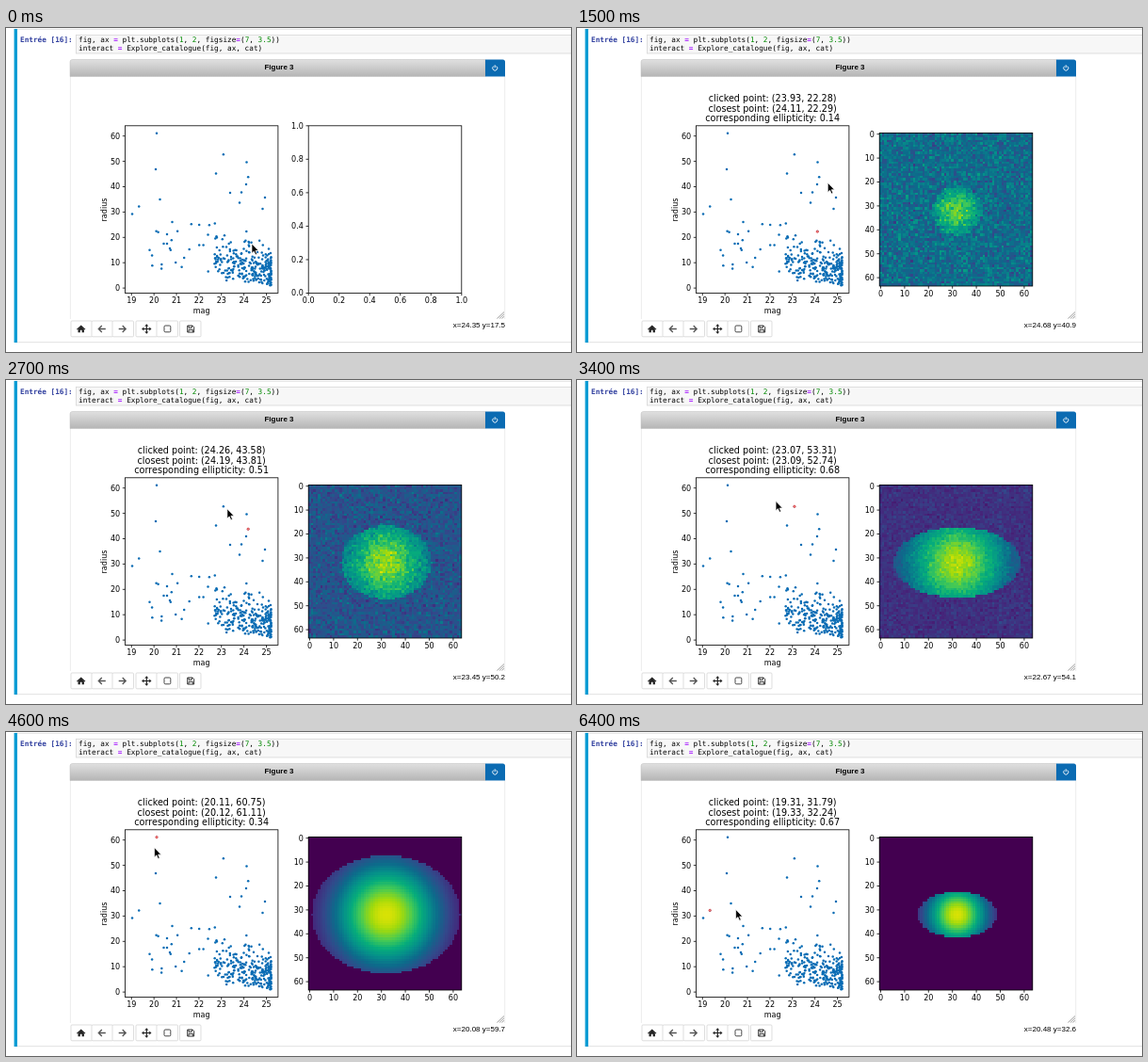
Write an HTML page with a canvas that moves like this. It is 600 by 344 pixels and loops after 7000 ms.

```html
<!DOCTYPE html>
<html lang="fr">
<head>
<meta charset="utf-8">
<style>
html, body { margin: 0; width: 100%; height: 100%; overflow: hidden; background: #fff; }
canvas { position: absolute; left: 321.2px; top: 111.4px; width: 162.6px; height: 162.6px; image-rendering: pixelated; }
svg { position: absolute; left: 0; top: 0; width: 600px; height: 344px; }
.plot { font: 8.05px "DejaVu Sans", sans-serif; }
.title { font-size: 9.65px; text-anchor: middle; }
.axis { fill: none; stroke: #000; stroke-width: .8; }
.code { font: 7.73px "DejaVu Sans Mono", monospace; white-space: pre; }
.op { fill: #a2f; font-weight: bold; }
.num { fill: #080; }
.ui { font: 8px "Liberation Sans", Arial, sans-serif; }
.head { font-weight: bold; text-anchor: middle; }
</style>
</head>
<body>
<canvas id="image" width="64" height="64"></canvas>
<svg viewBox="0 0 600 344">
  <defs>
    <linearGradient id="bar" x2="0" y2="1">
      <stop stop-color="#e0e0e0"/><stop offset="1" stop-color="#b5b5b5"/>
    </linearGradient>
  </defs>
  <path d="M9 1.3H600M9 333.7H600" stroke="#d4d4d4" stroke-width=".7"/>
  <rect x="8.6" y="1" width="3.4" height="333" fill="#089cd4"/>
  <rect x="74.5" y="7.5" width="540" height="19.5" fill="#f7f7f7" stroke="#d2d2d2" stroke-width=".7"/>
  <g class="code">
    <text x="15" y="15.3" fill="#303f9f" font-weight="bold">Entrée [16]:</text>
    <text x="77" y="15.3">fig, ax <tspan class="op">=</tspan> plt.subplots(<tspan class="num">1</tspan>, <tspan class="num">2</tspan>, figsize<tspan class="op">=</tspan>(<tspan class="num">7</tspan>, <tspan class="num">3.5</tspan>))</text>
    <text x="77" y="24.3">interact <tspan class="op">=</tspan> Explore_catalogue(fig, ax, cat)</text>
  </g>
  <path d="M68.4 51V309M529.7 51V309" stroke="#e4e4e4" stroke-width=".7"/>
  <path d="M68 51.5V36q0-2.5 2.5-2.5H509v18Z" fill="url(#bar)" stroke="#bbb" stroke-width=".5"/>
  <path d="M509 33.5h18.5q2.5 0 2.5 2.5v15.5h-21Z" fill="#0b6bb2"/>
  <path d="M517.9 40.5a2.5 2.5 0 1 0 2.7 0M519.2 39.3v3" fill="none" stroke="#fff" stroke-width=".9"/>
  <text class="ui head" x="290" y="44.2">Figure 3</text>
  <path d="M521.5 308.5l7.5-7M524 308.5l5-4.7M526.5 308.5l2.5-2.3" stroke="#777" stroke-width=".7"/>
  <g id="buttons" fill="#fff" stroke="#d0d0d0" stroke-width=".7"></g>
  <g fill="#222">
    <path d="M75 319.7l4.7-4.2 4.7 4.2-.7.7-4-3.5-4 3.5ZM76.5 319.9l3.2-2.8 3.2 2.8v3.3h-2.3v-2.4h-1.8v2.4h-2.3Z"/>
    <path id="arrow" d="M105.8 319.5h-7M101.8 316l-3.5 3.5 3.5 3.5" fill="none" stroke="#555" stroke-width="1.3"/>
    <use href="#arrow" transform="matrix(-1 0 0 1 225.5 0)"/>
    <path d="M145.5 319.5h7.6M149.3 315.7v7.6" stroke="#222" stroke-width="1.2"/>
    <path d="M149.3 314.3l2 2.3h-4ZM149.3 324.7l2-2.3h-4ZM144.1 319.5l2.3-2v4ZM154.5 319.5l-2.3-2v4Z"/>
    <rect x="168" y="316" width="6.8" height="6.8" rx="1.2" fill="none" stroke="#333" stroke-width=".9"/>
    <path d="M192.7 316h5.3l1.7 1.7v5.3h-7ZM194 316v2.3h3.3V316M194 323v-2.6h4.4v2.6" fill="none" stroke="#222" stroke-width=".9"/>
  </g>
  <text id="coords" class="ui" x="530" y="318.2" text-anchor="end"></text>
  <g class="plot">
    <g id="scatter"></g>
    <g id="empty"></g>
    <g id="pixels"></g>
    <text x="207.7" y="302.5" text-anchor="middle">mag</text>
    <text transform="translate(106.5 193) rotate(-90)" text-anchor="middle">radius</text>
    <g id="title" class="title"><text x="207.7" y="78.2"/><text x="207.7" y="88.6"/><text x="207.7" y="99"/></g>
    <circle id="picked" r="1.2" fill="#f58a86" stroke="#e53434" stroke-width=".6"/>
  </g>
  <path id="cursor" d="M0 0V10.2L2.3 8.1 3.9 11.8 5.6 11.1 4 7.5H7.2Z" stroke="#fff" stroke-width=".7"/>
</svg>
<script>
const $ = id => document.getElementById(id);
const px = mag => 133.3 + (mag - 19) * 23.87;
const py = radius => 276.1 - radius * 2.69;

function seeded(seed) {
  return () => {
    seed = (seed + 0x6D2B79F5) | 0;
    let z = Math.imul(seed ^ seed >>> 15, 1 | seed);
    z = z + Math.imul(z ^ z >>> 7, 61 | z) ^ z;
    return ((z ^ z >>> 14) >>> 0) / 4294967296;
  };
}
const gauss = rand => (rand() + rand() + rand() + rand() - 2) * 1.73;

// Each click: when the pointer arrives and leaves (the click itself), the points named
// in the title, and a round glow (spread) cut off by an ellipse (half axes a, b) over a noisy base.
// "via" is a point passed on the way there.
const clicks = [
  { arrive: 700, leave: 1000, at: [23.93, 22.28], near: [24.11, 22.29], ell: .14,
    a: 10.3, b: 10.3, spread: 80, base: .38 },
  { via: [1500, 24.68, 40.9], arrive: 1800, leave: 2200, at: [24.26, 43.58], near: [24.19, 43.81], ell: .51,
    a: 19, b: 15.2, spread: 270, base: .29 },
  { arrive: 3000, leave: 3200, at: [23.07, 53.31], near: [23.09, 52.74], ell: .68,
    a: 26.5, b: 14.6, spread: 400, base: .17 },
  { via: [4100, 19.94, 59.3], arrive: 4300, leave: 4500, at: [20.11, 60.75], near: [20.12, 61.11], ell: .34,
    a: 31, b: 24.6, spread: 500, base: 0 },
  { via: [5400, 19.38, 31.2], arrive: 5500, leave: 5700, at: [19.31, 31.79], near: [19.33, 32.24], ell: .67,
    a: 16.5, b: 9.6, spread: 165, base: 0 }
];

// Ticks are [label, position] pairs
function axes(x, y, w, h, xTicks, yTicks) {
  const bottom = y + h;
  return `<rect class="axis" x="${x}" y="${y}" width="${w}" height="${h}"/>` +
    xTicks.map(([s, p]) => `<path class="axis" d="M${p} ${bottom}v2.7"/>
      <text x="${p}" y="${bottom + 10.9}" text-anchor="middle">${s}</text>`).join('') +
    yTicks.map(([s, p]) => `<path class="axis" d="M${x} ${p}h-2.7"/>
      <text x="${x - 5.3}" y="${p + 2.9}" text-anchor="end">${s}</text>`).join('');
}
const ticks = (n, start, step, pos) =>
  Array.from({ length: n }, (_, i) => [start + i * step, pos(start + i * step)]);
const fractions = pos => ticks(6, 0, 2, pos).map(([v, p]) => [(v / 10).toFixed(1), p]);

// The isolated points, then a thin field of bright ones and a dense faint cluster
function scatterPoints() {
  const rand = seeded(16);
  const list = [
    [159, 150], [163.5, 182], [134, 197.5], [223, 154.5], [255.5, 142.5], [255, 166], [238, 175],
    [250, 174.5], [248, 185.5], [275, 180], [272.5, 192], [176.5, 206], [171, 219],
    ...clicks.map(c => [px(c.near[0]), py(c.near[1])])
  ];
  for (let i = 0; i < 24; i++) list.push([222 - 76 * rand() ** 1.4, 208 + 54 * rand()]);
  while (list.length < 310) {
    const x = 281.5 - 60 * rand() ** 1.8;
    const y = 249 + (x - 240) * .27 + 12.5 * gauss(rand);
    if (y > 203 && y < 267 + (x - 225) * .12) list.push([x, y]);
  }
  return list;
}
$('scatter').innerHTML = scatterPoints().map(([x, y]) =>
  `<circle cx="${x.toFixed(1)}" cy="${y.toFixed(1)}" r="1.25" fill="#0a6cb4"/>`).join('') +
  axes(126.5, 103.8, 162.4, 177.7, ticks(7, 19, 1, px), ticks(7, 0, 10, py));
$('empty').innerHTML = axes(321.2, 103.8, 162.6, 177.7,
  fractions(v => 321.2 + v * 16.26), fractions(v => 281.5 - v * 17.77));
$('pixels').innerHTML = axes(321.2, 111.4, 162.6, 162.6,
  ticks(7, 0, 10, v => 322.5 + v * 2.54), ticks(7, 0, 10, v => 112.7 + v * 2.54));
$('buttons').innerHTML = [69, 91, 113, 138, 160, 184.5].map(x =>
  `<rect x="${x}" y="311" width="22.5" height="16.8" rx="1"/>`).join('');

const scale = ['430050', '462379', '32498b', '0d6a8b', '058f8a', '06ad7b', '44c955', 'a2da0c', 'fde700']
  .map(hex => [0, 2, 4].map(i => parseInt(hex.slice(i, i + 2), 16)));
function colour(v) {
  const p = Math.max(0, Math.min(.999, v)) * 8, i = Math.floor(p);
  return scale[i].map((c, k) => c + (scale[i + 1][k] - c) * (p - i));
}

function drawImage({ a, b, spread, base, leave }) {
  const ctx = $('image').getContext('2d'), img = ctx.createImageData(64, 64), rand = seeded(leave);
  const gain = .95 - 1.35 * base, noise = .18 * base;
  for (let i = 0; i < 4096; i++) {
    const x = i % 64 - 32, y = (i >> 6) - 32;
    const inside = (x / a) ** 2 + (y / b) ** 2 <= 1;
    const glow = inside ? gain * Math.exp(-(x * x + y * y) / spread) : 0;
    img.data.set([...colour(base + glow + noise * gauss(rand)), 255], i * 4);
  }
  ctx.putImageData(img, 0, 0);
}

let shown;
function showClick(c) {
  if (c === shown) return;
  shown = c;
  for (const id of ['image', 'pixels', 'title', 'picked']) $(id).style.display = c ? '' : 'none';
  $('empty').style.display = c ? 'none' : '';
  if (!c) return;
  drawImage(c);
  const pair = p => `(${p[0].toFixed(2)}, ${p[1].toFixed(2)})`;
  [`clicked point: ${pair(c.at)}`, `closest point: ${pair(c.near)}`, `corresponding ellipticity: ${c.ell.toFixed(2)}`]
    .forEach((s, i) => $('title').children[i].textContent = s);
  $('picked').setAttribute('transform', `translate(${px(c.near[0])} ${py(c.near[1])})`);
}

// Pointer path: [time, mag, radius], eased from stop to stop
const path = [
  [100, 24.35, 17.5],
  ...clicks.flatMap(c => [...(c.via ? [c.via] : []), [c.arrive, ...c.at], [c.leave, ...c.at]]),
  [6400, 20.48, 32.6]
];
function pointer(t) {
  const last = path.length - 1;
  t = Math.max(path[0][0], Math.min(path[last][0], t));
  const i = Math.max(1, path.findIndex(stop => stop[0] >= t));
  const a = path[i - 1], b = path[i], u = (t - a[0]) / (b[0] - a[0]), e = u * u * (3 - 2 * u);
  return [1, 2].map(k => a[k] + (b[k] - a[k]) * e);
}

function frame() {
  const t = Math.min(6400, Math.floor(performance.now() % 7000 / 100) * 100);
  showClick(clicks.filter(c => c.leave <= t).pop() || null);
  // The readout trails the pointer by one step
  const [mag, radius] = pointer(t), [m, r] = pointer(t + 100);
  $('coords').textContent = `x=${mag.toFixed(2)} y=${radius.toFixed(1)}`;
  $('cursor').setAttribute('transform', `translate(${px(m)} ${py(r)})`);
  requestAnimationFrame(frame);
}
frame();
</script>
</body>
</html>
```
